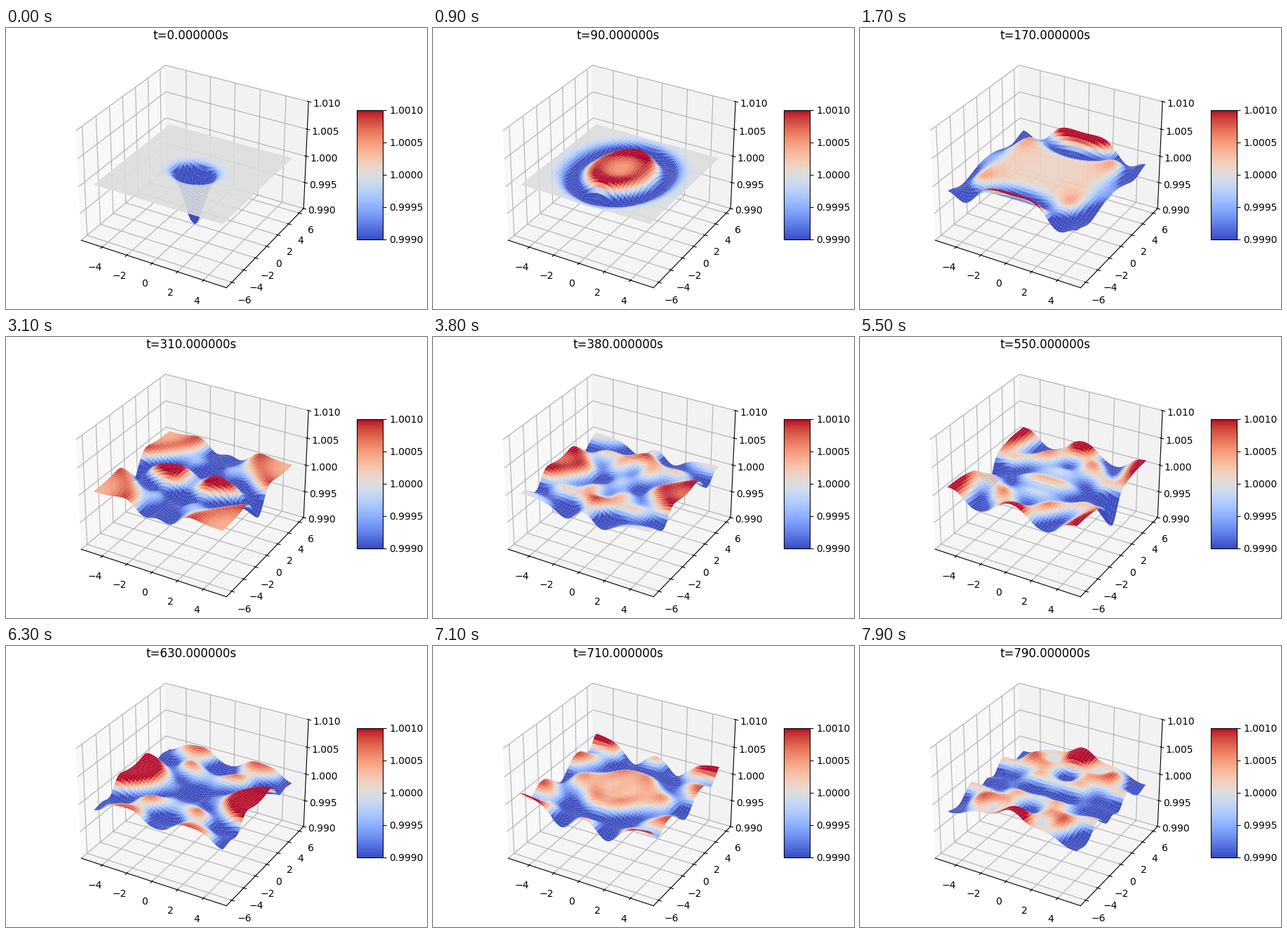
These frames come from a looping animation (600x400 px, 8000 ms). A matplotlib script:

```python
import matplotlib.pyplot as plt
import numpy as np
from matplotlib.animation import FuncAnimation

FRAMES, STEP = 80, 10
W, H = 600, 400
SIDE, LEFT, BOTTOM = 368.5, 79.4, 7.0    # square 3D view, in pixels
N = 51                                   # grid points per side
LX, LY = 10.0, 12.0                      # plotted extent
WX, WY = 12.0, 10.0                      # extent felt by the waves
SPEED, DEPTH, SPREAD = 0.0373, 0.01, 1.0

x = np.linspace(-LX / 2, LX / 2, N)
y = np.linspace(-LY / 2, LY / 2, N)
X, Y = np.meshgrid(x, y)
m = np.arange(0, 60, 2)


def modes(pos, length):
    """Cosine basis and the coefficients of a centred Gaussian."""
    k = m * np.pi / length
    coef = 2 / length * np.sqrt(np.pi * SPREAD) * np.exp(-SPREAD * k**2 / 4)
    coef[0] /= 2
    sign = (-1.0) ** (m // 2)
    return np.cos(np.outer(pos + length / 2, k)), coef * sign


basis_x, coef_x = modes(x, LX)
basis_y, coef_y = modes(y, LY)
amp = -DEPTH * np.outer(coef_y, coef_x)
omega = SPEED * np.pi * np.hypot(m[:, None] / WY, m[None, :] / WX)


def height(t):
    return 1 + basis_y @ (amp * np.cos(omega * t)) @ basis_x.T


def surface(t):
    return ax.plot_surface(X, Y, height(t), cmap="coolwarm", linewidth=0,
                           vmin=0.999, vmax=1.001, rcount=N, ccount=N)


def place(left, bottom, width, height):
    return left / W, bottom / H, width / W, height / H


fig = plt.figure(figsize=(W / 100, H / 100), dpi=100)
ax = fig.add_axes(place(LEFT, BOTTOM, SIDE, SIDE), projection="3d")
cax = fig.add_axes(place(499.8, BOTTOM + SIDE / 4, SIDE / 10, SIDE / 2))
ax.set_zlim(0.99, 1.01)
ax.set_zticks(np.linspace(0.99, 1.01, 5))
title = ax.set_title("t=0.000000s")
surf = surface(0)
fig.colorbar(surf, cax=cax)


def update(i):
    global surf
    surf.remove()
    surf = surface(i * STEP)
    title.set_text(f"t={i * STEP:f}s")
    return surf, title


anim = FuncAnimation(fig, update, frames=FRAMES, interval=100,
                     init_func=lambda: (), repeat=True, repeat_delay=0)
plt.show()
```
